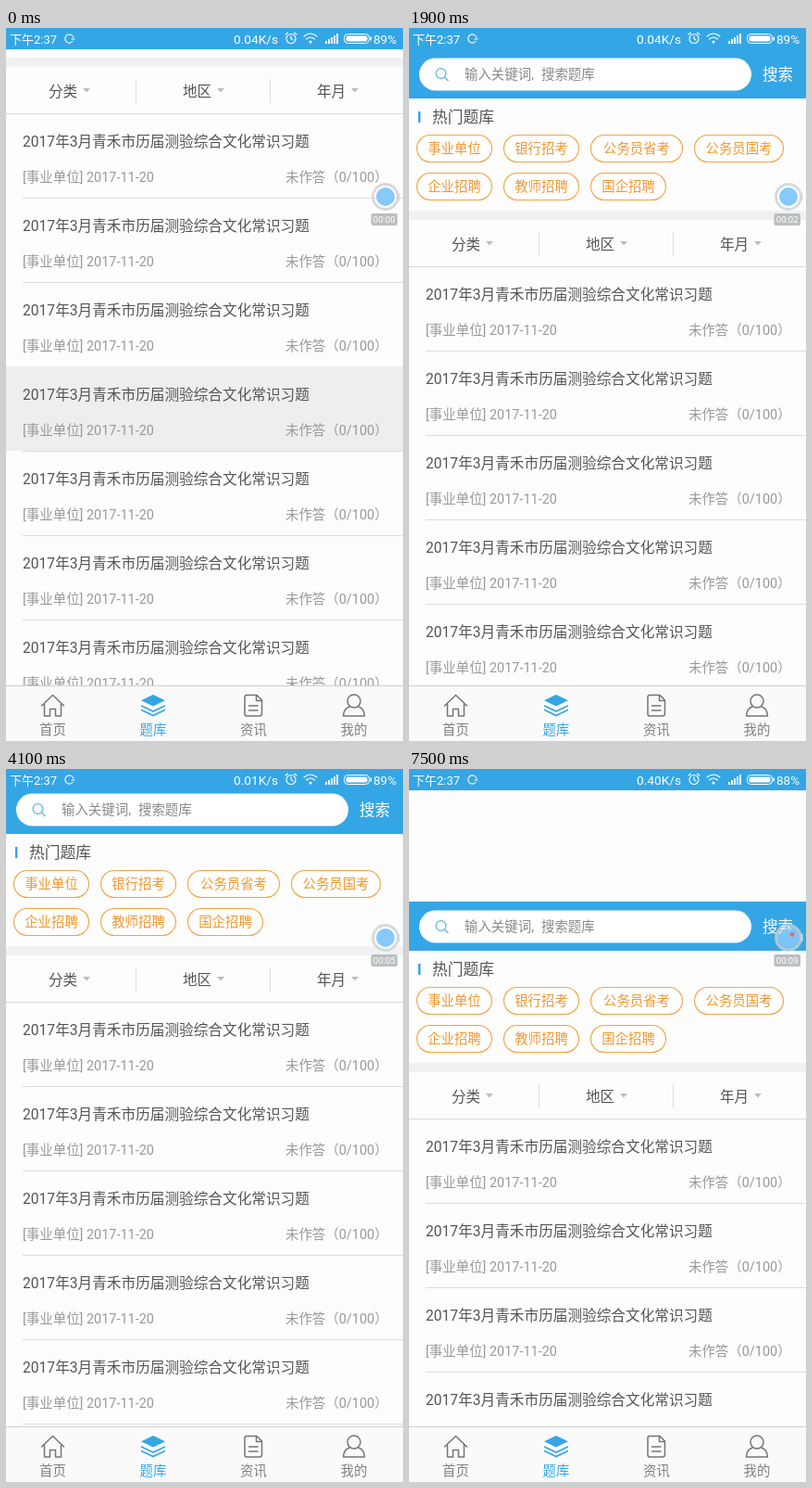
These frames come from a looping animation (429x769 px, 7600 ms). An HTML page:

```html
<!DOCTYPE html>
<html lang="zh">
<head>
<meta charset="utf-8">
<style>
html, body { margin: 0; width: 100%; height: 100%; overflow: hidden; background: #fdfdfd; }
svg { display: block; width: 100%; height: 100%; }
text { font-family: Roboto, "Noto Sans CJK SC", "Noto Sans CJK", sans-serif; }
.line { fill: none; stroke: #757575; stroke-width: 1.5; stroke-linejoin: round; stroke-linecap: round; }
.thin { fill: none; stroke: #fff; stroke-width: 1.1; stroke-linecap: round; }
</style>
</head>
<body>
<svg viewBox="0 0 429 769" preserveAspectRatio="none">
  <g id="header">
    <rect id="sky" y="23" width="429" fill="#35a6e5"/>
    <path id="lens" fill="#fff"/>
    <g id="loader">
      <circle r="32.3" fill="none" stroke="#fff" stroke-width="3.6" id="ring" transform="rotate(-90)"/>
      <circle r="24.5" fill="#fff" id="ball"/>
      <path id="slit" d="M0 0L0 -24.5A24.5 24.5 0 0 1 4 -24.2Z" fill="#b5dcf5"/>
    </g>
    <circle id="flood" cx="213" cy="83" fill="#fdfdfd"/>
  </g>
  <g id="page"></g>
  <g id="filter"></g>
  <g id="status"></g>
  <g id="tabs"></g>
  <g id="recorder"></g>
</svg>
<script>
const BLUE = '#35a6e5', LOOP = 7600, STEP = 100, REST = 287;
const $ = id => document.getElementById(id);
const set = (id, attrs) => {
  for (const k in attrs) $(id).setAttribute(k, attrs[k]);
};
const text = (x, y, size, fill, str, extra = '') =>
  `<text x="${x}" y="${y}" dy=".37em" font-size="${size}" fill="${fill}" ${extra}>${str}</text>`;
const rect = (x, y, w, h, fill, extra = '') =>
  `<rect x="${x}" y="${y}" width="${w}" height="${h}" fill="${fill}" ${extra}/>`;
const mid = 'text-anchor="middle"';

// Piecewise linear lookup over [time, value] pairs
function at(keys, t) {
  let i = 1;
  while (i < keys.length - 1 && keys[i][0] < t) i++;
  const [t0, a] = keys[i - 1], [t1, b] = keys[i];
  const p = Math.min(1, Math.max(0, (t - t0) / (t1 - t0)));
  return a + (b - a) * p;
}

// Page content, laid out at its resting position
const tag = (x, y, w, label) =>
  rect(x + .5, y - 14.5, w, 29, '#fff', 'rx="14.5" stroke="#f2a444" stroke-width="1.1"') +
  text(x + .5 + w / 2, y, 14.4, '#f0982f', label, mid);

function row(i) {
  const y = REST + i * 91;
  return (i === 3 ? rect(0, y - 30, 429, 91, '#efeeee', 'id="press"') : '') +
    text(18, y, 15.65, '#555', '2017年3月青禾市历届测验综合文化常识习题') +
    text(18, y + 38.5, 14.45, '#999', '[事业单位] 2017-11-20') +
    text(302, y + 38.5, 14.45, '#999', '未作答（0/100）') +
    rect(18, y + 61, 411, 1, '#dcdcdc');
}

$('page').innerHTML =
  rect(0, 76, 429, 900, '#fdfdfd') +
  rect(0, 23, 429, 53, BLUE) +
  rect(11, 32.5, 359, 35, '#fff', 'rx="17.5"') +
  '<g fill="none" stroke="#55b1e2" stroke-width="1.2"><circle cx="34.5" cy="49" r="5.4"/><path d="M38.5 53l4 4"/></g>' +
  text(60, 50, 14.45, '#8a8a8a', '输入关键词,') +
  text(143, 50, 14.45, '#8a8a8a', '搜索题库') +
  text(382, 50, 16.6, '#fff', '搜索') +
  rect(10, 90, 2.4, 12, BLUE) +
  text(25, 96, 16.8, '#555', '热门题库') +
  tag(8, 130, 81, '事业单位') + tag(102, 130, 81, '银行招考') +
  tag(196, 130, 99, '公务员省考') + tag(308, 130, 96, '公务员国考') +
  tag(8, 171, 81, '企业招聘') + tag(102, 171, 81, '教师招聘') + tag(196, 171, 81, '国企招聘') +
  rect(0, 197, 429, 10, '#f1f1f1') +
  [0, 1, 2, 3, 4, 5, 6].map(row).join('');

// Filter bar, centred on y = 0
$('filter').innerHTML =
  rect(0, -25, 429, 50, '#fdfdfd') +
  ['分类', '地区', '年月'].map((s, i) =>
    text(46 + i * 145, 0, 15.6, '#555', s) +
    `<path d="M${83 + i * 145} -3h8l-4 4.5z" fill="#bdbdbd"/>`).join('') +
  rect(140, -13, 1, 26, '#ddd') + rect(285, -13, 1, 26, '#ddd') +
  rect(0, 24, 429, 1, '#d9d9d9', 'id="edge"');

$('status').innerHTML =
  rect(0, 0, 429, 23, BLUE) +
  text(4, 12, 13, '#fff', '下午2:37') +
  '<path class="thin" d="M72 14.5A4.6 4.6 0 1 1 73 10.5M71 12h3"/>' +
  text(294, 12, 13.7, '#fff', '', 'id="speed" text-anchor="end"') +
  '<g class="thin"><circle cx="308" cy="11.5" r="5"/><path d="M308 8.5v3l2 1.5M302 7l2.5-2M314 7l-2.5-2"/></g>' +
  '<g class="thin" stroke-width="1.7"><path d="M322 9q7 -6 14 0M324.5 12q4.5 -4 9 0"/><circle cx="329" cy="15" r="1" fill="#fff"/></g>' +
  [0, 1, 2, 3, 4].map(i => rect(345 + i * 3, 14 - i * 2, 2, 3 + i * 2, '#fff')).join('') +
  rect(365.5, 6.5, 27, 10, 'none', 'rx="4" stroke="#fff"') +
  rect(367.5, 8.5, 23, 6, '#fff', 'rx="2"') + rect(393.5, 9.5, 1.5, 4, '#fff') +
  text(397, 12, 13.5, '#fff', '', 'id="battery"');

$('tabs').innerHTML =
  rect(0, 709, 429, 60, '#fafafa') + rect(0, 709, 429, 1, '#cfcfcf') +
  '<path class="line" d="M38.5 731L50.5 719.5L62.5 731M41.5 729V742H47.5V734.5H53.5V742H59.5V729"/>' +
  `<g fill="${BLUE}"><path d="M159 719l13 6.2l-13 6.2l-13 -6.2z"/>` +
  '<path d="M146 730l13 6l13 -6v1.8l-13 6.2l-13 -6.2z"/><path d="M146 734.5l13 6l13 -6v1.8l-13 6.2l-13 -6.2z"/></g>' +
  '<path class="line" d="M260 719.5H271L276.500 725V739.500Q276.500 742 274 742H260Q258 742 258 739.500V722Q258 719.500 260 719.500ZM270.500 720V725.500H276M262.500 731H272M262.500 736H272"/>' +
  '<g class="line"><circle cx="376" cy="726" r="7"/><path d="M371 732Q365 734 364.500 742H387.500Q387 734 381 732"/></g>' +
  ['首页', '题库', '资讯', '我的'].map((s, i) =>
    text(50.5 + i * 108.5, 757, 14.4, i === 1 ? BLUE : '#808080', s, mid)).join('');

$('recorder').innerHTML =
  '<circle cx="410" cy="182" r="13.5" fill="#fff" fill-opacity=".35" stroke="#c9cdd0" stroke-opacity=".75" stroke-width="3"/>' +
  '<circle cx="410" cy="182" r="10" fill="#7cc4fa" fill-opacity=".92"/>' +
  rect(423.5, 178, 2, 8, '#d5d8da') +
  '<circle id="dot" cx="414" cy="178.500" r="2.4" fill="#ee6a6a"/>' +
  rect(394.5, 200, 28.5, 13, '#b4b8ba', 'rx="2" fill-opacity=".9"') +
  text(408.7, 206.7, 9.6, '#fff', '', `id="clock" ${mid}`);

// Vertical place of the first list title
const scroll = [
  [0, 122], [200, 116], [500, 96], [1100, 98], [1200, 119], [1300, 160], [1500, 240],
  [1700, 280], [1800, REST], [2300, REST], [2500, 250], [2700, 172], [2800, 128],
  [2900, 96], [3500, 96], [3600, 112], [3800, 210], [4000, 270], [4100, 281],
  [4200, REST], [4500, REST], [4800, 365], [5100, 430], [5200, 432], [5400, 407], [LOOP, 407]
];
const lift = [[5300, 60], [5600, 0]];
const sweep = [[5550, 0], [5850, 1]];
const bend = [[4800, 0], [5200, 16], [5500, 8]];
const flood = [[6800, 0], [7200, 235]];

function draw(t) {
  const y = at(scroll, t), pull = Math.max(0, y - REST), base = 23 + pull;
  const stuck = y - 54 < 48;

  set('page', { transform: `translate(0 ${y - REST})` });
  set('filter', { transform: `translate(0 ${Math.max(48, y - 54)})` });
  set('edge', { opacity: stuck ? 0 : 1 });
  set('press', { opacity: Math.max(0, 1 - t / 300) });

  set('header', { visibility: pull ? 'visible' : 'hidden' });
  set('sky', { height: pull });
  set('lens', { d: `M0 ${base + 1}Q214 ${base + .5 - at(bend, t)} 429 ${base + 1}Z` });
  const around = 2 * Math.PI * 32.3, part = at(sweep, t);
  set('loader', { transform: `translate(213 ${83 + at(lift, t)})`, opacity: t >= 5300 ? 1 : 0 });
  set('ring', { 'stroke-dasharray': `${around * part} ${around}`, opacity: part ? 1 : 0 });
  set('slit', { opacity: part });
  set('flood', { r: at(flood, t) });

  $('speed').textContent = t < 3600 ? '0.04K/s' : t < 6400 ? '0.01K/s' : '0.40K/s';
  $('battery').textContent = t < 6400 ? '89%' : '88%';
  $('clock').textContent = '00:0' + Math.floor(t * .00125 + .5);
  set('dot', { opacity: (t * .00126 + .56) % 1 < .4 ? 1 : 0 });
}

const start = performance.now();
function tick() {
  const t = (performance.now() - start) % LOOP;
  draw(Math.floor(t / STEP) * STEP);
  requestAnimationFrame(tick);
}
tick();
</script>
</body>
</html>
```
